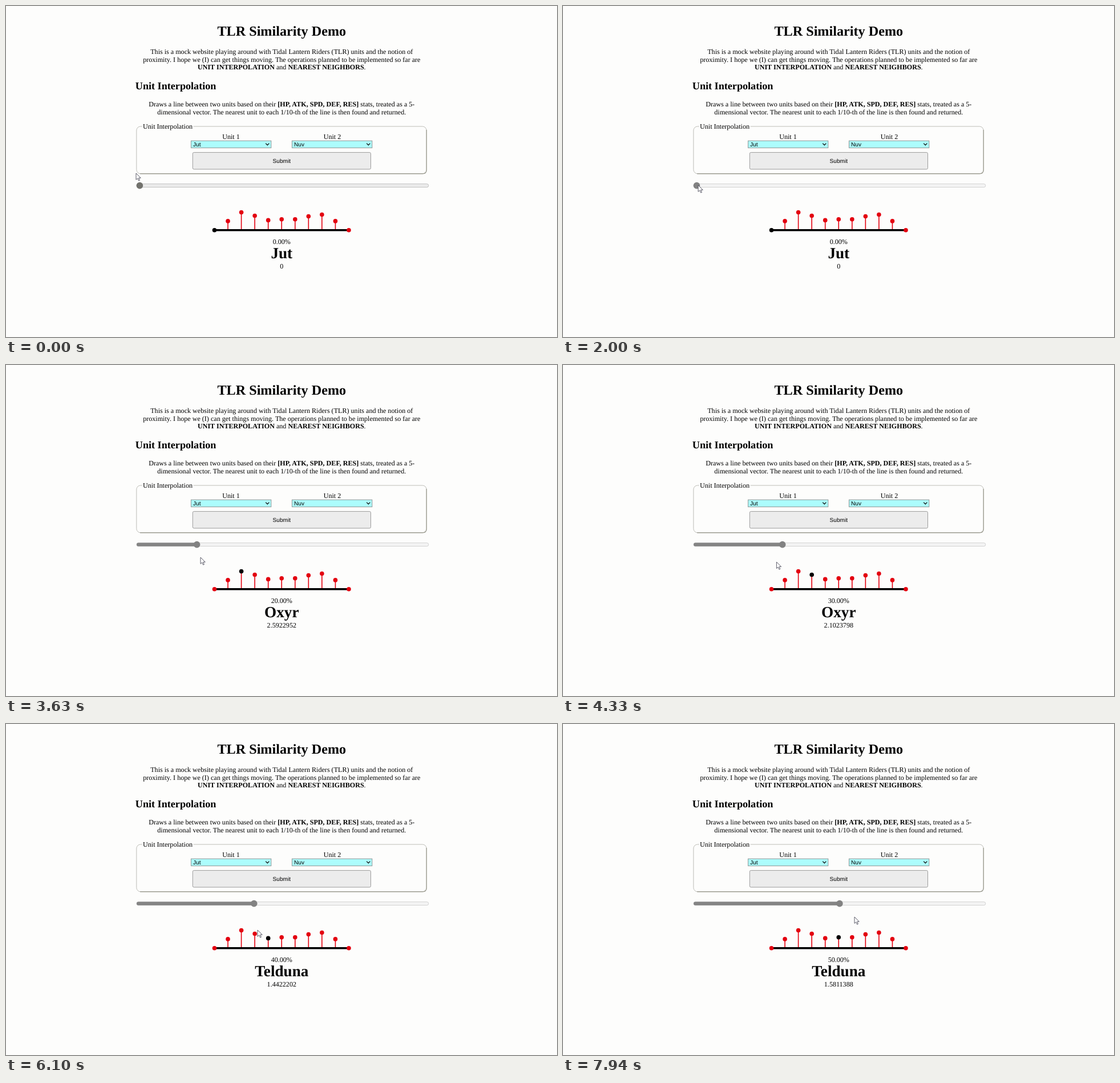
An HTML page that plays this animation: 966 px wide and 580 px high, repeating every 8 s.

```html
<!DOCTYPE html>
<html lang="en">
<head>
<meta charset="utf-8">
<title>TLR Similarity Demo</title>
<style>
  html, body { margin: 0; width: 100%; height: 100%; overflow: hidden; background: #fdfdfc; }
  svg { display: block; width: 966px; height: 580px; }
  text { font: 12.1px "Liberation Serif", "Times New Roman", serif; text-rendering: geometricPrecision; }
  .mid { text-anchor: middle; }
  .bold { font-weight: bold; }
  .h1 { font-size: 24.2px; font-weight: bold; }
  .h2 { font-size: 18.15px; font-weight: bold; }
  .name { font-size: 27.2px; font-weight: bold; }
  .ui { font: 10.08px "Liberation Sans", Arial, sans-serif; }
  .select rect { fill: #acfdfd; stroke: #8b9696; }
  .select path { fill: none; stroke: #111; stroke-width: 1.3; }
</style>
</head>
<body>
<svg viewBox="0 0 966 580">
  <text class="h1 mid" x="483.3" y="51.8">TLR Similarity Demo</text>
  <g class="mid">
    <text x="483.3" y="84.2">This is a mock website playing around with Tidal Lantern Riders (TLR) units and the notion of</text>
    <text x="483.3" y="97.8">proximity. I hope we (I) can get things moving. The operations planned to be implemented so far are</text>
    <text x="483.3" y="111.4"><tspan class="bold">UNIT INTERPOLATION</tspan> and <tspan class="bold">NEAREST NEIGHBORS</tspan>.</text>
    <text x="483.3" y="176">Draws a line between two units based on their <tspan class="bold">[HP, ATK, SPD, DEF, RES]</tspan> stats, treated as a 5-</text>
    <text x="483.3" y="189.6">dimensional vector. The nearest unit to each 1/10-th of the line is then found and returned.</text>
  </g>
  <text class="h2" x="226.8" y="146">Unit Interpolation</text>

  <!-- Form -->
  <rect x="228.8" y="211" width="508.4" height="82.8" rx="7" fill="none" stroke="#bdbdb7"/>
  <path d="M737.3 217V287q0 6.8-6.8 6.8H235" fill="none" stroke="#98988c" stroke-width="1.2"/>
  <rect x="238.5" y="206" width="90" height="10" fill="#fdfdfc"/>
  <text x="240" y="215.2">Unit Interpolation</text>
  <text class="mid" x="394.5" y="233">Unit 1</text>
  <text class="mid" x="572" y="233">Unit 2</text>
  <g class="select">
    <rect x="324.5" y="236.2" width="140.3" height="12.4"/>
    <text class="ui" x="328" y="246">Jut</text>
    <path d="M455.2 240.6l3.1 3.2 3.1-3.2"/>
  </g>
  <g class="select">
    <rect x="501.5" y="236.2" width="140.3" height="12.4"/>
    <text class="ui" x="505" y="246">Nuv</text>
    <path d="M632.2 240.6l3.1 3.2 3.1-3.2"/>
  </g>
  <rect x="327.3" y="256.6" width="312.2" height="29.4" rx="2.2" fill="#ececec" stroke="#9b9b9b"/>
  <text class="ui mid" x="483.3" y="274.6">Submit</text>

  <!-- Slider -->
  <rect id="track" x="229" y="311.7" width="511.8" height="5.9" rx="2.9" stroke-width=".9"/>
  <rect id="filled" x="229" y="311.5" height="6.3" rx="3"/>
  <circle id="thumb" cy="314.6" r="5.8"/>

  <g id="plot"></g>
  <g class="mid">
    <text id="percent" x="483.3" y="417"></text>
    <text id="name" class="name" x="483.3" y="442"></text>
    <text id="distance" x="483.3" y="460.4"></text>
  </g>
  <path id="cursor" d="M0 0V11.4L2.7 9 4.6 13.2 6.4 12.4 4.6 8.3H8.2Z" fill="#fff" stroke="#4a4a58" stroke-width=".9" stroke-linejoin="round"/>
</svg>
<script>
const DURATION = 8000, PRESS_TIME = 1800;
const NAMES = ["Jut", "Jut", "Oxyr", "Oxyr", "Telduna", "Telduna"];
const DISTANCES = [0, 1.3152946, 2.5922952, 2.1023798, 1.4422202, 1.5811388, 1.58, 2.01, 2.26, 1.3152946, 0];
// Pointer stops: time, x, y, eased arrival
const STOPS = [
  [0, 228, 293], [830, 329, 365, true], [1000, 329, 365], [1700, 237, 314, true], [2350, 237, 314],
  [3630, 341, 337], [5100, 411, 354], [6100, 441, 361], [7940, 511, 338], [DURATION, 511, 338]
];

const $ = id => document.getElementById(id);

function add(tag, attributes) {
  const node = document.createElementNS("http://www.w3.org/2000/svg", tag);
  set(node, attributes);
  return $("plot").appendChild(node);
}

function set(node, attributes) {
  for (const key in attributes) node.setAttribute(key, attributes[key]);
}

const BASE_Y = 392.7, RED = "#e3000f";
const points = DISTANCES.map((d, i) => ({ x: 365.5 + 23.55 * i, y: BASE_Y - 12 * d }));
for (const { x, y } of points) add("path", { d: `M${x} ${BASE_Y}V${y}`, stroke: RED, "stroke-width": 1.6 });
add("path", { d: `M365.5 ${BASE_Y}H601`, stroke: "#000", "stroke-width": 3.4 });
const dots = points.map(({ x, y }) => add("circle", { cx: x, cy: y, r: 3.8 }));

function pointerAt(t) {
  const i = STOPS.findIndex(stop => stop[0] > t);
  const [t0, x0, y0] = STOPS[i - 1], [t1, x1, y1, eased] = STOPS[i];
  let k = (t - t0) / (t1 - t0);
  if (eased) k = k * k * (3 - 2 * k);
  return [x0 + (x1 - x0) * k, y0 + (y1 - y0) * k];
}

function draw() {
  const t = performance.now() % DURATION;
  const [x, y] = pointerAt(t);
  const pressed = t >= PRESS_TIME;
  const lit = pressed || Math.abs(y - 314.6) < 6;
  const step = pressed ? Math.max(0, Math.round((x - 237) / 50.1)) : 0;
  const thumbX = 234.4 + 50.1 * step;

  set($("track"), { fill: lit ? "#f4f4f4" : "#ebebeb", stroke: lit ? "#cfcfcf" : "#bcbcbc" });
  set($("filled"), { width: thumbX - 229, fill: lit ? "#848484" : "#74746f" });
  set($("thumb"), { cx: thumbX, fill: lit ? "#828282" : "#72726d" });
  dots.forEach((dot, i) => set(dot, { fill: i === step ? "#000" : RED }));
  $("percent").textContent = (step * 10).toFixed(2) + "%";
  $("name").textContent = NAMES[step];
  $("distance").textContent = DISTANCES[step];
  set($("cursor"), { transform: `translate(${x} ${y})` });
  requestAnimationFrame(draw);
}
draw();
</script>
</body>
</html>
```
